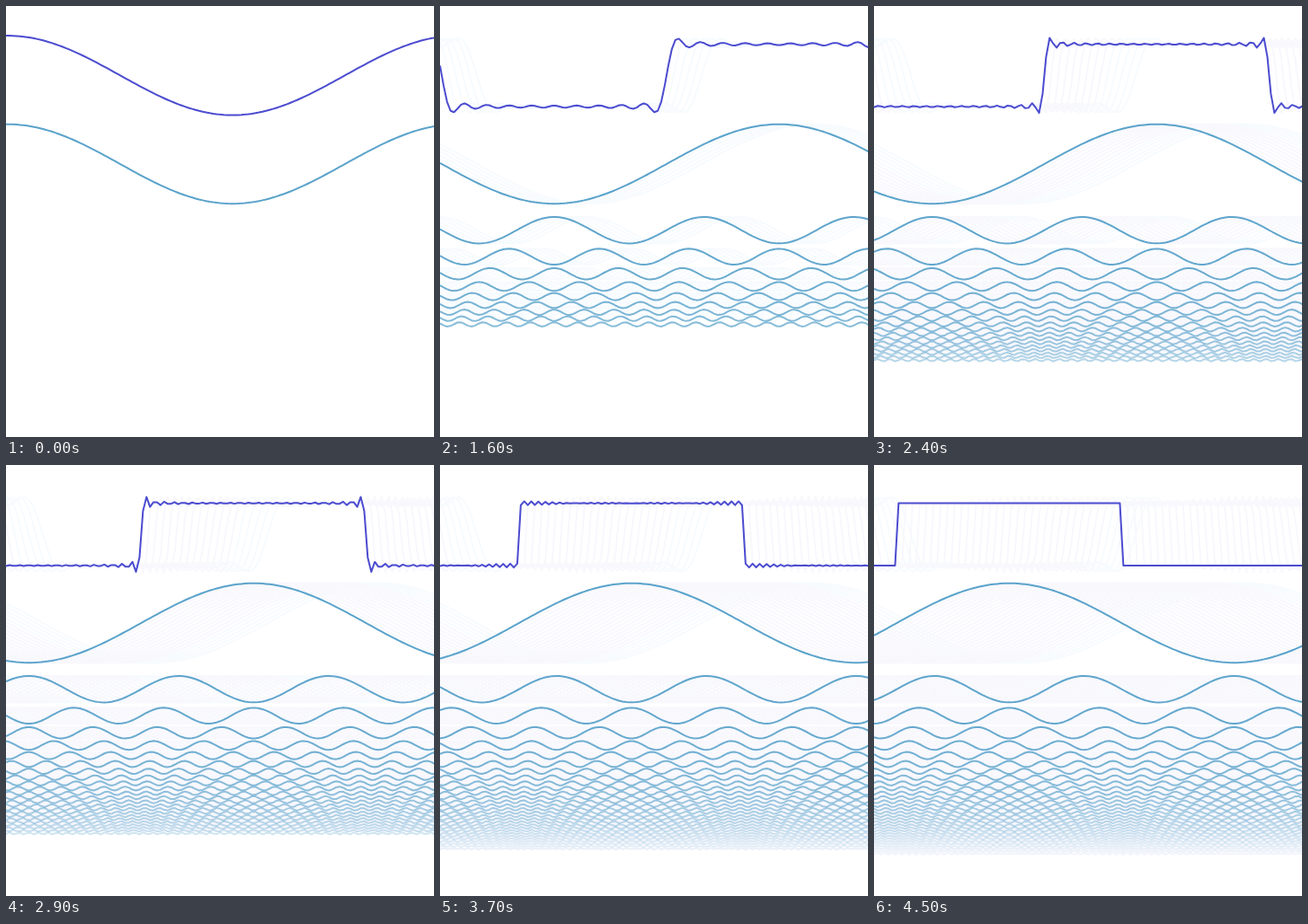
Animation, 476 px wide and 480 px high, one loop 4.6 s. Source, as an HTML page with a canvas:

```html
<!DOCTYPE html>
<html lang="en">
<head>
<meta charset="utf-8">
<title>Square wave from harmonics</title>
<style>
  html, body { margin: 0; width: 100%; height: 100%; overflow: hidden; background: #fff; }
  canvas { display: block; }
</style>
</head>
<body>
<canvas id="stage" width="476" height="480"></canvas>
<script>
const W = 476, H = 480;
const STEPS = 46, STEP_MS = 100;
const SAMPLES = 128, DX = 500 / SAMPLES, POINTS = Math.ceil(W / DX) + 1;
const TERMS = SAMPLES / 4;
const AMP = 34.72, TOP = 77.3, GAP = 1.25;
const FIRST_TRAIL = 11;

const ctx = document.getElementById('stage').getContext('2d');
const trailCanvas = document.createElement('canvas');
trailCanvas.width = W;
trailCanvas.height = H;
const trail = trailCanvas.getContext('2d');

// Odd harmonics of a sampled square wave, stacked in rows below it
const rows = [];
let y = TOP, above = AMP;
for (let k = 0; k < TERMS; k++) {
  const m = 2 * k + 1;
  const amp = AMP * 4 / SAMPLES / Math.sin(Math.PI * m / SAMPLES);
  y += GAP * (above + amp);
  above = amp;
  rows.push({ m, amp, y, alpha: 1 - k / TERMS });
}

const termCount = step =>
  Math.ceil(1 + 31 * (1 - Math.cos(Math.PI * step / (STEPS - 1))) / 2 - 1e-9);

const phase = (j, step) => 2 * Math.PI * (j - 0.5 + 2 * step + TERMS) / SAMPLES;

const wave = ({ m, amp }, j, step) => amp * Math.sin(m * phase(j, step));

function curve(c, base, height) {
  c.beginPath();
  for (let j = 0; j < POINTS; j++) c.lineTo(j * DX, base - height(j));
  c.stroke();
}

function drawWaves(c, step, sumColor, rowColor, fade) {
  const active = rows.slice(0, termCount(step));
  c.lineWidth = 2;
  c.lineJoin = 'round';
  c.strokeStyle = rowColor;
  for (const row of active) {
    c.globalAlpha = fade ? row.alpha : 1;
    curve(c, row.y, j => wave(row, j, step));
  }
  c.globalAlpha = 1;
  c.strokeStyle = sumColor;
  curve(c, TOP, j => active.reduce((sum, row) => sum + wave(row, j, step), 0));
}

let trailEnd = FIRST_TRAIL, shown = -1;

// Earlier poses stay behind as faint lines
function updateTrail(step) {
  if (step < trailEnd) {
    trail.clearRect(0, 0, W, H);
    trailEnd = FIRST_TRAIL;
  }
  for (; trailEnd < step; trailEnd++) {
    const color = trailEnd < 16 ? '#f7fbfe' : '#f8f8fd';
    drawWaves(trail, trailEnd, color, color, false);
  }
}

function frame(now) {
  const step = Math.floor(now / STEP_MS) % STEPS;
  if (step !== shown) {
    shown = step;
    updateTrail(step);
    ctx.fillStyle = '#fff';
    ctx.fillRect(0, 0, W, H);
    ctx.drawImage(trailCanvas, 0, 0);
    drawWaves(ctx, step, '#4c4cd0', '#5ba3cb', true);
  }
  requestAnimationFrame(tick);
}

const start = performance.now();
const tick = () => frame(performance.now() - start);
tick();
</script>
</body>
</html>
```
